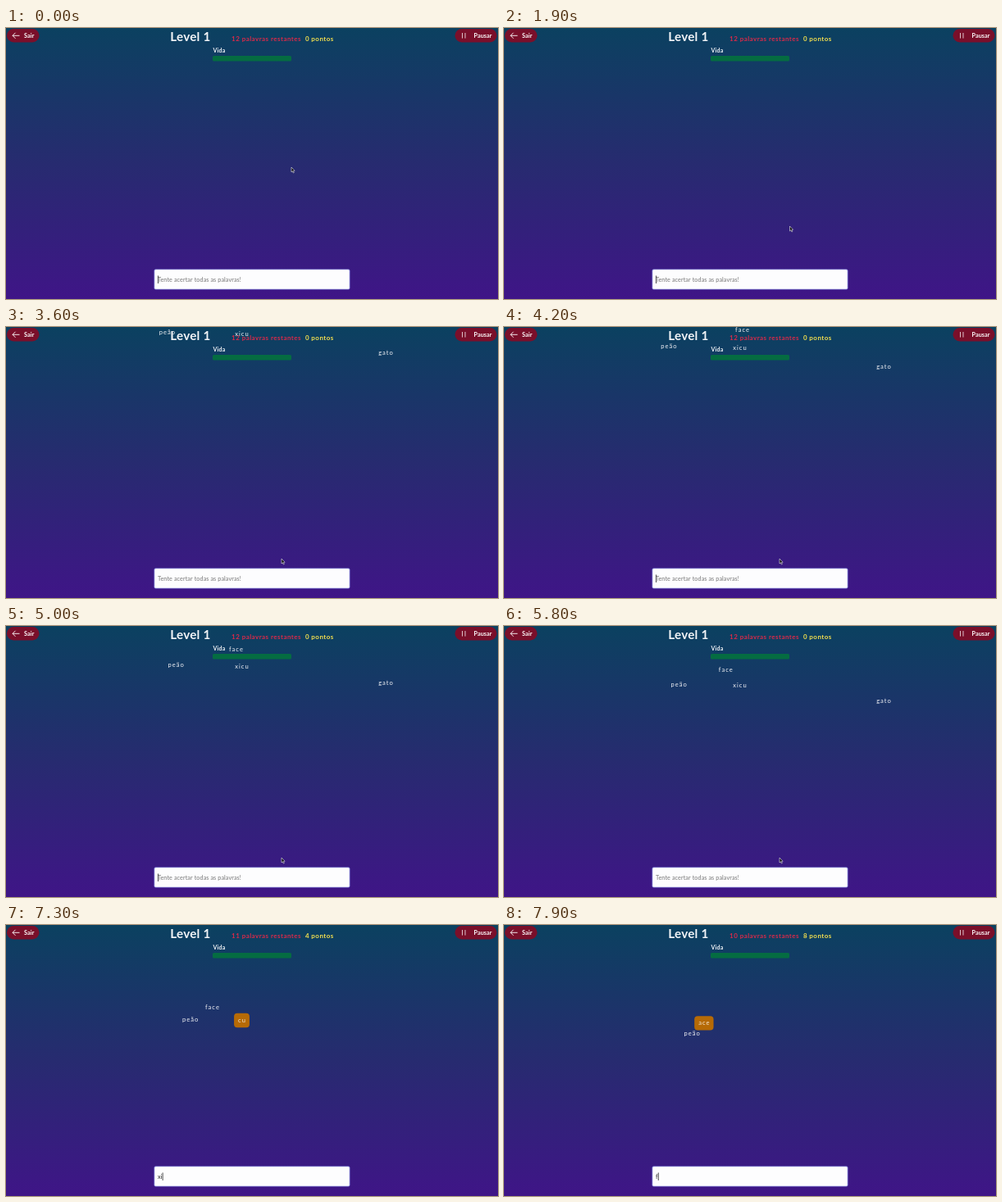
Animation of 600 by 331 pixels, one loop 8000 ms. Source, as an HTML page with a canvas:

```html
<!DOCTYPE html>
<html lang="pt">
<head>
<meta charset="utf-8">
<title>Level 1</title>
<style>
  html, body { margin: 0; width: 100%; height: 100%; overflow: hidden; background: #25296f; }
  canvas { display: block; width: 600px; height: 331px; }
</style>
</head>
<body>
<canvas id="stage"></canvas>
<script>
const W = 600, H = 331, LOOP = 8000;
const FONT = 'Lato, Inter, sans-serif';
const canvas = document.getElementById('stage');
const ctx = canvas.getContext('2d');
const dpr = window.devicePixelRatio || 1;
canvas.width = W * dpr;
canvas.height = H * dpr;
ctx.scale(dpr, dpr);

const sky = ctx.createLinearGradient(0, 0, 0, H);
sky.addColorStop(0, '#0b4160');
sky.addColorStop(0.5, '#272b70');
sky.addColorStop(1, '#3f1587');

// Falling words: position at time t0, velocity in px per ms, key times
const words = [
  { text: 'gato', x: 463, y: 10, t0: 2800, vx: 0, vy: 0.0273, keys: [6000, 6150, 6300, 6450] },
  { text: 'xicu', x: 287.5, y: 26, t0: 4200, vx: 0, vy: 0.0292, keys: [7050, 7200, 7350, 7500] },
  { text: 'face', x: 290.5, y: 4, t0: 4200, vx: -0.0126, vy: 0.0313, keys: [7850] },
  { text: 'peão', x: 201, y: 24, t0: 4200, vx: 0.0076, vy: 0.0295, keys: [] }
];
const firstKey = words[0].keys[0];

const pointerPath = [
  [0, 348, 170], [250, 348, 170], [800, 372, 200], [1500, 348.5, 242],
  [1950, 348.5, 242], [2500, 336, 283]
];

const ease = u => u * u * (3 - 2 * u);

function along(path, t) {
  for (let i = 1; i < path.length; i++) {
    const [ta, xa, ya] = path[i - 1], [tb, xb, yb] = path[i];
    if (t < tb) {
      const u = ease((t - ta) / (tb - ta));
      return [xa + (xb - xa) * u, ya + (yb - ya) * u];
    }
  }
  return path[path.length - 1].slice(1);
}

function style(size, weight, spacing) {
  ctx.font = `${weight} ${size}px ${FONT}`;
  ctx.letterSpacing = spacing + 'px';
}

function write(text, x, y, color) {
  ctx.fillStyle = color;
  ctx.fillText(text, x, y);
}

function box(x, y, w, h, r, color) {
  ctx.fillStyle = color;
  ctx.beginPath();
  ctx.roundRect(x, y, w, h, r);
  ctx.fill();
}

function lines(color, width, ...paths) {
  ctx.strokeStyle = color;
  ctx.lineWidth = width;
  ctx.beginPath();
  for (const p of paths) {
    p.forEach(([x, y], i) => i ? ctx.lineTo(x, y) : ctx.moveTo(x, y));
  }
  ctx.stroke();
}

function drawButtons() {
  box(1, 1, 39.5, 16.5, 8.25, '#7a0f2a');
  lines('#fff', 0.9, [[16.5, 9.3], [8, 9.3]], [[11.5, 5.8], [8, 9.3], [11.5, 12.8]]);
  box(547.5, 1, 51, 16.5, 8.25, '#7a0f2a');
  lines('#e8d5dc', 0.9, [[556.5, 6], [556.5, 12.6]], [[560, 6], [560, 12.6]]);
  style(7.2, 700, 0.1);
  write('Sair', 22, 11.8, '#fff');
  write('Pausar', 570.5, 11.8, '#fff');
}

function drawHeader(done) {
  const parts = [
    { text: 'Level 1', font: [15.2, 700, 0.25], y: 15.8, color: '#f3f5f8', gap: 25.5 },
    { text: `${12 - done} palavras restantes`, font: [8, 700, 0.45], y: 15.8, color: '#d92a4a', gap: 5 },
    { text: `${done * 4} pontos`, font: [8, 700, 0.45], y: 15.8, color: '#f3e04e', gap: 0 }
  ];
  let total = 0;
  for (const p of parts) {
    style(...p.font);
    p.w = ctx.measureText(p.text).width;
    total += p.w + p.gap;
  }
  let x = (W - total) / 2;
  for (const p of parts) {
    style(...p.font);
    write(p.text, x, p.y, p.color);
    x += p.w + p.gap;
  }
  style(7, 700, 0.2);
  write('Vida', 252.5, 30, '#f3f5f8');
  box(252, 34, 96, 6.5, 1.5, '#056c42');
}

function drawWord(word, t) {
  const typed = word.keys.filter(k => t >= k).length;
  if (typed === word.text.length) return;
  const dt = t - word.t0;
  const x = word.x + word.vx * dt, y = word.y + word.vy * dt;
  if (y < -8) return;
  const rest = word.text.slice(typed);
  style(7.6, 400, 1);
  const w = ctx.measureText(rest).width - 1;
  if (typed) box(x - w / 2 - 5, y - 8.7, w + 10, 17.4, 4, '#b66a06');
  write(rest, x - w / 2, y + 2.3, typed ? '#f3e6d2' : '#f0f1f5');
}

function drawInput(t) {
  box(180.5, 294.5, 239, 25, 2, '#8d8fe0');
  box(181.3, 295.3, 237.4, 23.4, 1.5, '#fdfdfe');
  const active = words.find(w => w.keys.length && t >= w.keys[0] &&
    (t < w.keys[3] || w.keys.length < 4));
  const typed = active ? active.text.slice(0, active.keys.filter(k => t >= k).length) : '';
  style(7.2, 400, 0.1);
  if (typed) write(typed, 185, 309.6, '#222');
  else write('Tente acertar todas as palavras!', 185, 309.6, '#757575');
  const blink = (t + 150) % 1000 < 500;
  if (typed || blink) {
    const x = 185.2 + (typed ? ctx.measureText(typed).width : 0);
    ctx.fillStyle = '#222';
    ctx.fillRect(x, 302.5, 0.8, 9.5);
  }
}

function drawPointer(t) {
  if (t >= firstKey) return;
  const [x, y] = along(pointerPath, t);
  ctx.beginPath();
  [[0, 0], [0, 6], [1.4, 4.8], [2.4, 7], [3.3, 6.6], [2.4, 4.5], [4.1, 4.3]]
    .forEach(([dx, dy], i) => i ? ctx.lineTo(x + dx, y + dy) : ctx.moveTo(x + dx, y + dy));
  ctx.closePath();
  ctx.fillStyle = '#111';
  ctx.fill();
  ctx.strokeStyle = '#e6e6ee';
  ctx.lineWidth = 0.6;
  ctx.stroke();
}

function draw(t) {
  ctx.fillStyle = sky;
  ctx.fillRect(0, 0, W, H);
  drawButtons();
  drawHeader(words.filter(w => w.keys.length === 4 && t >= w.keys[3]).length);
  words.forEach(w => drawWord(w, t));
  drawInput(t);
  drawPointer(t);
}

const start = performance.now();
function tick() {
  draw((performance.now() - start) % LOOP);
  requestAnimationFrame(tick);
}
tick();
</script>
</body>
</html>
```
